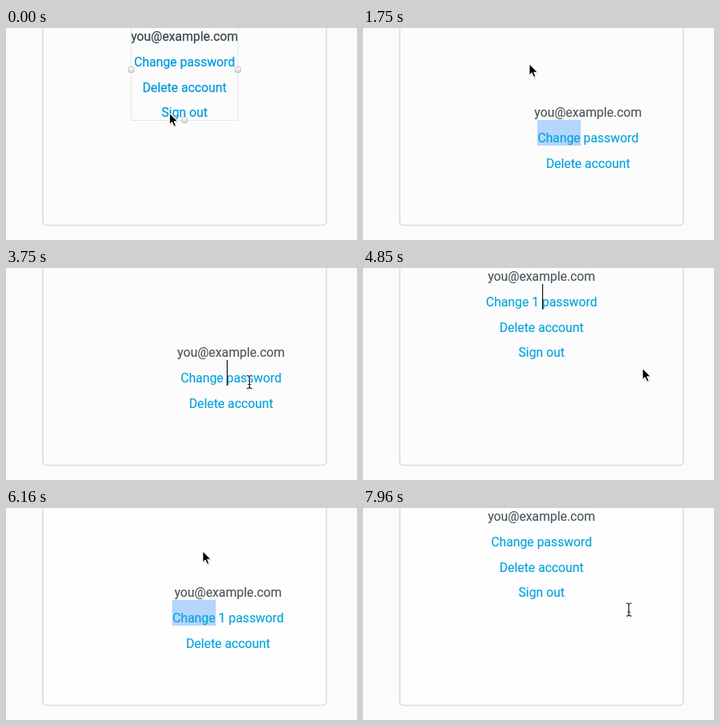
Recreate the animation shown at these times as an HTML page. Size 439 by 265 pixels, loop 7990 ms.

```html
<!DOCTYPE html>
<html lang="en">
<head>
<meta charset="utf-8">
<title>Editing a label</title>
<style>
  html, body { margin: 0; width: 100%; height: 100%; overflow: hidden; background: #fbfbfb; }
  svg { display: block; }
  text { font: 15.8px Roboto, "Open Sans", sans-serif; text-anchor: middle; white-space: pre; stroke-width: .15; }
  .mail { fill: #47555d; stroke: #47555d; }
  .link { fill: #00a2db; stroke: #00a2db; }
  .picked text { stroke-width: .25; }
  .picked .mail { fill: #37454e; stroke: #37454e; }
  .picked .link { fill: #0099e0; stroke: #0099e0; }
</style>
</head>
<body>
<svg width="439" height="265" viewBox="0 0 439 265">
  <defs>
    <linearGradient id="knob" x1="0" y1="0" x2="0" y2="1">
      <stop offset="0" stop-color="#fff"/>
      <stop offset="1" stop-color="#d4d4d4"/>
    </linearGradient>
    <rect id="handle" x="-3.5" y="-3.5" width="7" height="7" rx="1.8" fill="url(#knob)" stroke="#b9b9b9" stroke-width=".8"/>
    <path id="bar" d="M-3 -8Q0 -8 0 -6Q0 -8 3 -8M0 -6V6M-3 8Q0 8 0 6Q0 8 3 8M-1.5 3H1.5"/>
  </defs>
  <rect width="439" height="265" fill="#fbfbfb"/>
  <rect id="card" x="46" y="-20" width="354.6" height="266.7" rx="5" stroke="#dfdfdf" stroke-width="1.8"/>
  <g id="cardGrips">
    <use href="#handle" x="46" y="247"/>
    <use href="#handle" x="223.5" y="247"/>
    <use href="#handle" x="401" y="247"/>
  </g>
  <g id="labels">
    <rect id="mark" y="20" height="32" fill="#b4d5fe"/>
    <text class="mail" y="16">you@example.com</text>
    <text class="link" id="change" y="48"></text>
    <text class="link" y="80">Delete account</text>
    <text class="link" id="out" y="111">Sign out</text>
    <g id="group">
      <rect id="frame" y="-11.5" height="127" fill="none" stroke="#e6e6e6"/>
      <use id="gripL" href="#handle" y="52"/>
      <use id="gripR" href="#handle" y="52"/>
      <use href="#handle" y="115"/>
    </g>
    <rect id="caret" y="20" width="1.2" height="32" fill="#111"/>
  </g>
  <g id="arrow">
    <path d="M.6 1.6V15.6L4 12.6L6.4 18L9 16.8L6.6 11.8H11Z" opacity=".15"/>
    <path d="M0 0V14L3.2 11L5.6 16.4L8 15.3L5.7 10.3H10.2Z" stroke="#fff" stroke-linejoin="round"/>
  </g>
  <g id="beam" fill="none" stroke-linecap="round">
    <use href="#bar" stroke="#fff" stroke-width="2.6" opacity=".8"/>
    <use href="#bar" stroke="#222" stroke-width="1.2"/>
  </g>
</svg>
<script>
const LOOP = 7990;
const $ = id => document.getElementById(id);
const set = (id, attrs) => { for (const k in attrs) $(id).setAttribute(k, attrs[k]); };
const show = (id, on) => { $(id).style.display = on ? '' : 'none'; };
const within = (t, a, b) => t >= a && t < b;

// Pointer moves: start, end, x, y, sideways bow
const home = [204.5, 106.5];
const moves = [
  [180, 590, 206, 48, 13],
  [770, 830, 208, 45],
  [2110, 2530, 252.5, 159],
  [2650, 2740, 251, 144],
  [2880, 3240, 276, 143],
  [3540, 3750, 304.5, 142.5],
  [4450, 4850, 349.5, 125.5],
  [5290, 5660, 245.5, 52.5],
  [6130, 6540, 279, 138],
  [6680, 6770, 298.5, 137.5],
  [7900, 7960, 332.5, 127]
];

function pointer(t) {
  let [x, y] = home;
  for (const [from, to, px, py, bow = 0] of moves) {
    const u = Math.min(1, Math.max(0, (t - from) / (to - from)));
    const ease = u * u * (3 - 2 * u);
    x += (px - x) * ease + bow * Math.sin(Math.PI * u);
    y += (py - y) * ease;
  }
  return [x, y];
}

// What has been typed between the two words
function typed(t) {
  if (within(t, 4450, 7160)) return '1 ';
  return within(t, 3890, 7390) ? '1' : '';
}

function draw(t) {
  const extra = typed(t);
  const editing = within(t, 1690, 3890) || within(t, 5810, 7160);
  const picked = t < 1690 || within(t, 5660, 5810);

  set('card', { fill: t < 5020 ? '#fcfcfc' : '#fefefe' });
  show('cardGrips', within(t, 4990, 5660));

  const mid = editing ? (extra ? 277.8 : 281.5) : 223.3;
  set('labels', {
    transform: `translate(${mid} ${editing ? 95 : 0})`,
    class: picked ? 'picked' : ''
  });
  $('change').textContent = 'Change ' + extra + 'password';
  show('out', !editing);

  const half = extra ? 70 : 66.7;
  show('group', picked);
  set('frame', { x: -half, width: 2 * half });
  set('gripL', { x: -half });
  set('gripR', { x: half });

  // Selection and caret follow the measured letters
  const charX = i => $('change').getStartPositionOfChar(i).x;
  show('mark', within(t, 1720, 3250) || within(t, 5840, 6510));
  set('mark', { x: charX(0) - .5, width: charX(6) - charX(0) + 1 });
  show('caret', within(t, 3250, 4940) || within(t, 6510, 7930));
  set('caret', { x: Math.round(mid + charX(7 + extra.length)) - mid });

  // Typing hides the pointer until it moves again
  const hidden = within(t, 3890, 4480) || within(t, 7160, 7930);
  const [x, y] = pointer(t);
  const overText = (within(t, 1690, 4940) || t >= 5810) && within(x, 205, 348) && y > 95;
  show('arrow', !hidden && !overText);
  show('beam', !hidden && overText);
  set(overText ? 'beam' : 'arrow', { transform: `translate(${x} ${y})` });
}

const start = performance.now();
function tick() {
  draw((performance.now() - start) % LOOP);
  requestAnimationFrame(tick);
}
tick();
</script>
</body>
</html>
```
